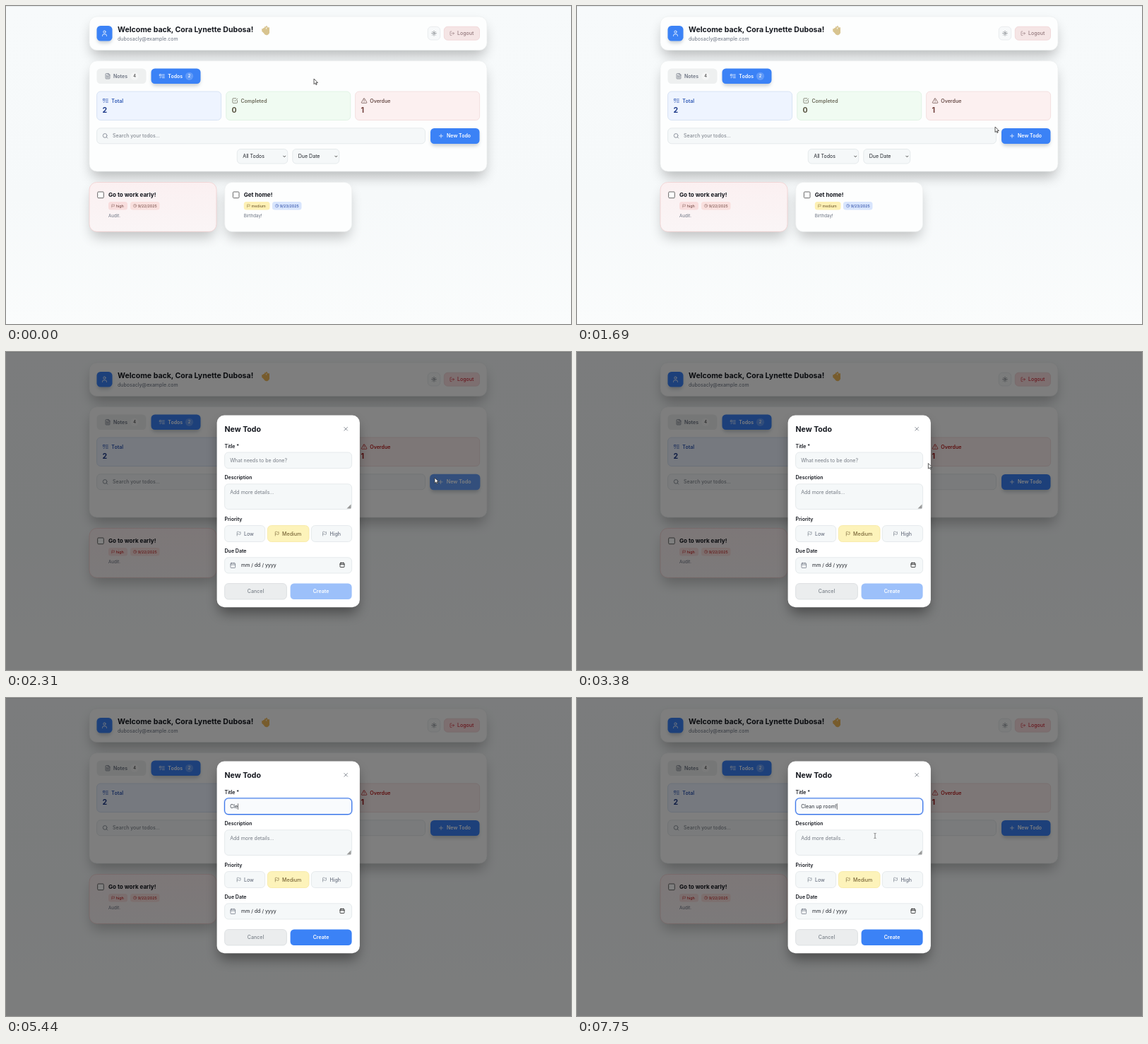
An HTML page for the animation above (8 s loop, 800 by 450 pixels).

```html
<!DOCTYPE html>
<html lang="en">
<head>
<meta charset="utf-8">
<title>Todo dashboard</title>
<style>
  html, body { margin: 0; width: 100%; height: 100%; overflow: hidden; }
  svg { display: block; width: 100vw; height: 100vh; font-family: Inter, sans-serif; }
  #stage {
    --logout: #92777b; --logoutBg: #f5e5e5; --overdue: #6b4f4b; --overdueNum: #703f3b;
    --high: #7d5550; --hand: #d8c48f;
  }
  #stage.open {
    --logout: #d02f3c; --logoutBg: #fbdfe1; --overdue: #b91c1c; --overdueNum: #a01818;
    --high: #c02424; --hand: #f0b95a;
  }
</style>
</head>
<body>
<svg id="stage" viewBox="0 0 800 450">
  <defs>
    <linearGradient id="sky" x2="0" y2="1">
      <stop stop-color="#f7fafb"/><stop offset=".6" stop-color="#f6f9fa"/><stop offset="1" stop-color="#fafcfc"/>
    </linearGradient>
    <linearGradient id="blush" x2="0" y2="1">
      <stop stop-color="#fbf0f1"/><stop offset="1" stop-color="#faf5f6"/>
    </linearGradient>
    <filter id="soft" x="-30%" y="-80%" width="160%" height="260%"><feGaussianBlur stdDeviation="9"/></filter>
    <filter id="tight" x="-30%" y="-80%" width="160%" height="260%"><feGaussianBlur stdDeviation="2.5"/></filter>
  </defs>
  <g id="page"></g>
  <g id="dialog">
    <rect width="800" height="450" opacity=".5"/>
    <g id="form"></g>
  </g>
  <path id="arrow" d="M0 0V7.6L1.8 6L3 8.6L4.2 8L3.1 5.5H5.4Z" fill="#fff" stroke="#333" stroke-width=".8" stroke-linejoin="round"/>
  <path id="beam" d="M-1.6 -3.6Q0 -3.6 0 -2.8Q0 -3.6 1.6 -3.6M0 -2.8V2.8M-1.6 3.6Q0 3.6 0 2.8Q0 3.6 1.6 3.6" fill="none" stroke="#555" stroke-width=".7"/>
</svg>
<script>
const $ = id => document.getElementById(id);

const ICONS = {
  user: 'M19 21v-2a4 4 0 0 0-4-4H9a4 4 0 0 0-4 4v2M16 7a4 4 0 1 1-8 0a4 4 0 0 1 8 0',
  file: 'M15 2H6a2 2 0 0 0-2 2v16a2 2 0 0 0 2 2h12a2 2 0 0 0 2-2V7ZM14 2v6h6M8 9h2M8 13h8M8 17h8',
  list: 'M3 5h6v6H3ZM3 17l2 2 4-4M13 6h8M13 12h8M13 18h8',
  check: 'M21 11v8a2 2 0 0 1-2 2H5a2 2 0 0 1-2-2V5a2 2 0 0 1 2-2h11M9 11l3 3L22 4',
  alert: 'M10.3 4L2 18a2 2 0 0 0 1.7 3h16.6A2 2 0 0 0 22 18L13.7 4a2 2 0 0 0-3.4 0ZM12 9v4M12 17v.1',
  search: 'M19 11a8 8 0 1 1-16 0a8 8 0 0 1 16 0M21 21l-4.3-4.3',
  plus: 'M5 12h14M12 5v14',
  close: 'M18 6L6 18M6 6l12 12',
  flag: 'M4 22V4c3-2 5-2 8 0s5 2 8 0v11c-3 2-5 2-8 0s-5-2-8 0',
  clock: 'M22 12a10 10 0 1 1-20 0a10 10 0 0 1 20 0M12 6v6l4 2',
  calendar: 'M5 4h14a2 2 0 0 1 2 2v14a2 2 0 0 1-2 2H5a2 2 0 0 1-2-2V6a2 2 0 0 1 2-2ZM3 10h18M8 2v4M16 2v4',
  logout: 'M9 21H5a2 2 0 0 1-2-2V5a2 2 0 0 1 2-2h4M16 17l5-5-5-5M21 12H9',
  sun: 'M16 12a4 4 0 1 1-8 0a4 4 0 0 1 8 0M12 2v2M12 20v2M5 5l1.4 1.4M17.6 17.6L19 19M2 12h2M20 12h2M6.4 17.6L5 19M19 5l-1.4 1.4',
  chevron: 'M5 9l7 7 7-7'
};

// Boxes are given by their left, top, right and bottom edges; text and icons by their vertical centre.
const box = (x, y, x2, y2, r, fill, stroke = 'none', extra = '') =>
  `<rect x="${x}" y="${y}" width="${x2 - x}" height="${y2 - y}" rx="${r}" fill="${fill}" stroke="${stroke}" stroke-width=".7" ${extra}/>`;
const text = (x, cy, str, fill, size = 7.04, weight = 400, extra = '') =>
  `<text x="${x}" y="${cy + size * .36}" font-size="${size}" font-weight="${weight}" fill="${fill}" ${extra}>${str}</text>`;
const middle = 'text-anchor="middle"';
const icon = (name, cx, cy, size, color, width = 2) =>
  `<path d="${ICONS[name]}" transform="translate(${cx - size / 2} ${cy - size / 2}) scale(${size / 24})" fill="none"
    stroke="${color}" stroke-width="${width}" stroke-linecap="round" stroke-linejoin="round"/>`;
const card = (x, y, x2, y2, fill = '#fdfefe', stroke = '#eceff0', shade = .25) =>
  box(x + 3, y + 12, x2 - 3, y2 + 8, 9, '#000', 'none', `opacity="${shade}" filter="url(#soft)"`) +
  box(x, y, x2, y2, 10.5, fill, stroke);
const glow = (x, y, x2, y2) =>
  box(x + 1, y + 3, x2 - 1, y2 + 3, 5, '#345', 'none', 'opacity=".25" filter="url(#tight)"');

const INK = '#15181f', GREY = '#6b7280', BLUE = '#3b82f6', FIELD = '#f5f8f9', EDGE = '#dde2e5';

const stat = (x, fill, edge, name, label, value, color, numColor) =>
  box(x, 121, x + 176, 161.5, 5.3, fill, edge) + icon(name, x + 12.5, 134, 8.8, color) +
  text(x + 20.7, 134, label, color, 7.04, 600) + text(x + 7.8, 147.2, value, numColor, 10.56, 700);

const select = (x, x2, label) =>
  box(x, 202.5, x2, 223, 5, FIELD, EDGE) + text(x + 8, 212.8, label, '#20242b') +
  icon('chevron', x2 - 4.5, 212.8, 5, '#222', 4);

const badge = (x, x2, name, label, fill, color) =>
  box(x, 277, x2, 288.5, 3.5, fill) + icon(name, x + 6.6, 282.7, 5.3, color) +
  text(x + 10.8, 282.7, label, color, 5.28, 500);

const todo = (x, title, note) =>
  box(x + 11.7, 263, x + 20.3, 271.7, 1.2, '#fff', '#666', 'style="stroke-width:1"') +
  text(x + 27, 267, title, INK, 8.1, 700) + text(x + 27, 297, note, GREY, 6.16);

$('page').innerHTML =
  box(0, 0, 800, 450, 0, 'url(#sky)') + box(0, 0, 800, .8, 0, '#dfe4e7') +
  card(118, 15, 681, 62.5) + glow(128.5, 28, 150.5, 49.5) + box(128.5, 28, 150.5, 49.5, 5.3, BLUE) +
  icon('user', 139.5, 38.7, 10, '#fff') +
  text(158, 33.5, 'Welcome back, Cora Lynette Dubosa!', INK, 10.56, 700) +
  text(158, 46, 'dubosacly@example.com', GREY) +
  `<path transform="translate(361 28)" d="M2 5l4 3V2M4 4l4 4M8 1l2 5M11 3v5a3 3 0 0 1-6 2L2 7" fill="var(--hand)" stroke="var(--hand)" stroke-width="2" stroke-linecap="round" stroke-linejoin="round"/>` +
  box(597.3, 29.3, 614.7, 48, 5, '#f7f9fa', '#e3e6e9') + icon('sun', 606, 38.7, 8, '#555b63') +
  box(620.3, 29.2, 670.5, 48.2, 5, 'var(--logoutBg)', '#eccfd0') +
  icon('logout', 631.7, 38.8, 7.4, 'var(--logout)') + text(639, 38.8, 'Logout', 'var(--logout)', 7.04, 500) +

  card(118, 77.8, 681, 234) +
  box(128.5, 88.5, 198.5, 110, 5.3, '#eef0f0') + icon('file', 144, 99.3, 8.8, GREY) +
  text(152, 99.3, 'Notes', GREY, 7.04, 600) + '<circle cx="182" cy="99.3" r="5.5" fill="#f5f6f6"/>' +
  text(182, 99.3, '4', '#555', 5.6, 600, middle) +
  glow(205.5, 88.5, 275.5, 110) + box(205.5, 88.5, 275.5, 110, 5.3, BLUE) + icon('list', 221, 99.3, 8.8, '#fff') +
  text(229.3, 99.3, 'Todos', '#fff', 7.04, 600) + '<circle cx="259.5" cy="99.3" r="5.6" fill="#629bf8"/>' +
  text(259.5, 99.3, '2', '#fff', 5.6, 600, middle) +
  stat(128.6, '#eef4ff', '#ccdaf0', 'list', 'Total', 2, '#2c56b4', '#1e3a8a') +
  stat(311.7, '#f0fbf2', '#d8efdd', 'check', 'Completed', 0, '#6a6858', '#585341') +
  stat(494.6, '#fcf0f0', '#f0d6d6', 'alert', 'Overdue', 1, 'var(--overdue)', 'var(--overdueNum)') +
  box(128.6, 172.8, 593.5, 194.8, 5.3, FIELD, EDGE) + icon('search', 140.5, 183.8, 8.6, GREY) +
  text(151, 183.8, 'Search your todos...', '#757b84') +
  '<g id="newTodo">' + glow(601, 173, 670.5, 195) + box(601, 173, 670.5, 195, 5.3, BLUE, 'none', 'id="newTodoFill"') +
  icon('plus', 616, 183.9, 8.6, '#fff') + text(624, 183.9, 'New Todo', '#fff', 7.04, 600) + '</g>' +
  select(327.3, 398.7, 'All Todos') + select(405.8, 471.8, 'Due Date') +

  card(118, 249.5, 298, 319.3, 'url(#blush)', '#f3cccc', .22) + todo(118, 'Go to work early!', 'Audit.') +
  badge(145, 172, 'flag', 'high', '#f8dddd', 'var(--high)') +
  badge(176, 217.5, 'clock', '9/22/2025', '#f9e0de', 'var(--high)') +
  card(309.7, 249.5, 489.7, 319.3, '#fdfefe', '#eceff0', .22) + todo(309.7, 'Get home!', 'Birthday!') +
  badge(336.8, 373.5, 'flag', 'medium', '#fdf0b4', '#7a6538') +
  badge(377, 418.5, 'clock', '9/23/2025', '#d8e5fd', '#2f4fa8');

const label = (cy, str) => text(309.5, cy, str, INK, 7.04, 600);
const field = (y, y2, extra) => box(309.6, y, 489.6, y2, 5.3, FIELD, EDGE, extra);
const priority = (x, x2, flagX, name, fill, edge, color) =>
  box(x, 245.6, x2, 268.5, 5.3, fill, edge) + icon('flag', flagX, 257, 7.2, color) +
  text(flagX + 7.4, 257, name, color, 7.04, 500);

$('form').innerHTML =
  card(298.6, 89.6, 500.9, 361.2, '#fff', 'none', .4) +
  text(309.5, 109, 'New Todo', INK, 10.56, 700) + icon('close', 481.2, 108.8, 9.2, '#666d78') +
  label(133, 'Title *') + field(142, 164.6) +
  `<g id="focus">${box(308.8, 141.2, 490.4, 165.4, 6, 'none', '#b9d2fb', 'style="stroke-width:1"')}
    ${box(309.6, 142, 489.6, 164.6, 5.3, '#f9fbfd', '#3b74e8', 'style="stroke-width:1.1"')}</g>` +
  text(317.2, 153.5, '', INK, 7.04, 400, 'id="titleText" xml:space="preserve"') +
  '<rect id="caret" y="149.3" width=".6" height="8.6" fill="#222"/>' +
  label(177.5, 'Description') + field(186.8, 222.5) + text(317.2, 198, 'Add more details...', '#757b84') +
  '<path d="M488.5 215.5v6h-6z" fill="#999"/>' +
  label(236.5, 'Priority') +
  priority(309.6, 366.6, 329.6, 'Low', FIELD, EDGE, GREY) +
  priority(370.4, 429, 383.7, 'Medium', '#fdf3ba', '#f6e69a', '#796638') +
  priority(432.4, 489.6, 451, 'High', FIELD, EDGE, GREY) +
  label(281.5, 'Due Date') + field(290.8, 313) + icon('calendar', 321.3, 301.8, 8.8, GREY) +
  text(333, 301.8, 'mm / dd / yyyy', '#20242b') + icon('calendar', 476, 301.2, 8, '#222', 2.4) +
  box(309.6, 327.6, 397.4, 350, 5.3, '#ebedee', '#d5d9dc') + text(353.5, 338.8, 'Cancel', '#7a8089', 7.04, 500, middle) +
  box(402.6, 327.4, 489.6, 350, 5.3, BLUE, 'none', 'id="create"') +
  text(446, 338.8, 'Create', '#fff', 7.04, 600, middle);

const LOOP = 8000, OPEN = 2310, FOCUS = 3800;
const TITLE = 'Clean up room!';
const KEYS = [4690, 5060, 5430, 5560, 5690, 5810, 5940, 6060, 6250, 6375, 6560, 6750, 7000, 7280];
const POINTER = [[0, 436, 103], [880, 436, 103], [1690, 592, 171], [2190, 607, 178], [2870, 607, 178],
  [3690, 446, 148], [7060, 446, 148], [7700, 422, 195]];

const ramp = (t, from, to) => Math.min(1, Math.max(0, (t - from) / (to - from)));
const ease = k => k * k * (3 - 2 * k);

function pointerAt(t) {
  let [, x, y] = POINTER[0];
  for (let i = 1; i < POINTER.length; i++) {
    const [from, x0, y0] = POINTER[i - 1], [to, x1, y1] = POINTER[i];
    if (t < from) break;
    const k = ease(ramp(t, from, to));
    x = x0 + (x1 - x0) * k;
    y = y0 + (y1 - y0) * k;
  }
  return [x, y];
}

const show = (id, on) => $(id).setAttribute('visibility', on ? 'visible' : 'hidden');

function draw(t) {
  const open = t >= OPEN;
  $('stage').classList.toggle('open', open);
  $('dialog').style.display = open ? '' : 'none';

  const hover = ramp(t, 1800, 1950) * (1 - ramp(t, 2330, 2560));
  $('newTodo').setAttribute('transform', `translate(635.7 184) scale(${1 + .025 * hover}) translate(-635.7 -184)`);
  $('newTodoFill').setAttribute('fill', `rgb(${59 + 43 * hover},${130 + 30 * hover},${246 + 4 * hover})`);

  const typed = KEYS.filter(k => k <= t).length;
  const title = $('titleText');
  title.textContent = typed ? TITLE.slice(0, typed) : 'What needs to be done?';
  title.setAttribute('fill', typed ? '#262b33' : '#757b84');
  $('create').setAttribute('fill-opacity', .5 + .5 * ramp(t, KEYS[0], KEYS[0] + 150));

  const focused = t >= FOCUS;
  const blinkFrom = typed ? KEYS[typed - 1] : FOCUS;
  $('focus').style.opacity = ramp(t, FOCUS, FOCUS + 150);
  $('caret').setAttribute('x', 317.2 + (typed && open ? title.getComputedTextLength() : 0));
  $('caret').style.display = focused && (t - blinkFrom) % 1000 < 500 ? '' : 'none';

  const [x, y] = pointerAt(t);
  const overField = open && x < 489;
  const hidden = t >= KEYS[0] && t < 7060;
  for (const id of ['arrow', 'beam']) $(id).setAttribute('transform', `translate(${x} ${y})`);
  show('arrow', !overField && !hidden);
  show('beam', overField && !hidden);
}

const start = performance.now();
function tick() {
  draw((performance.now() - start) % LOOP);
  requestAnimationFrame(tick);
}
tick();
</script>
</body>
</html>
```
